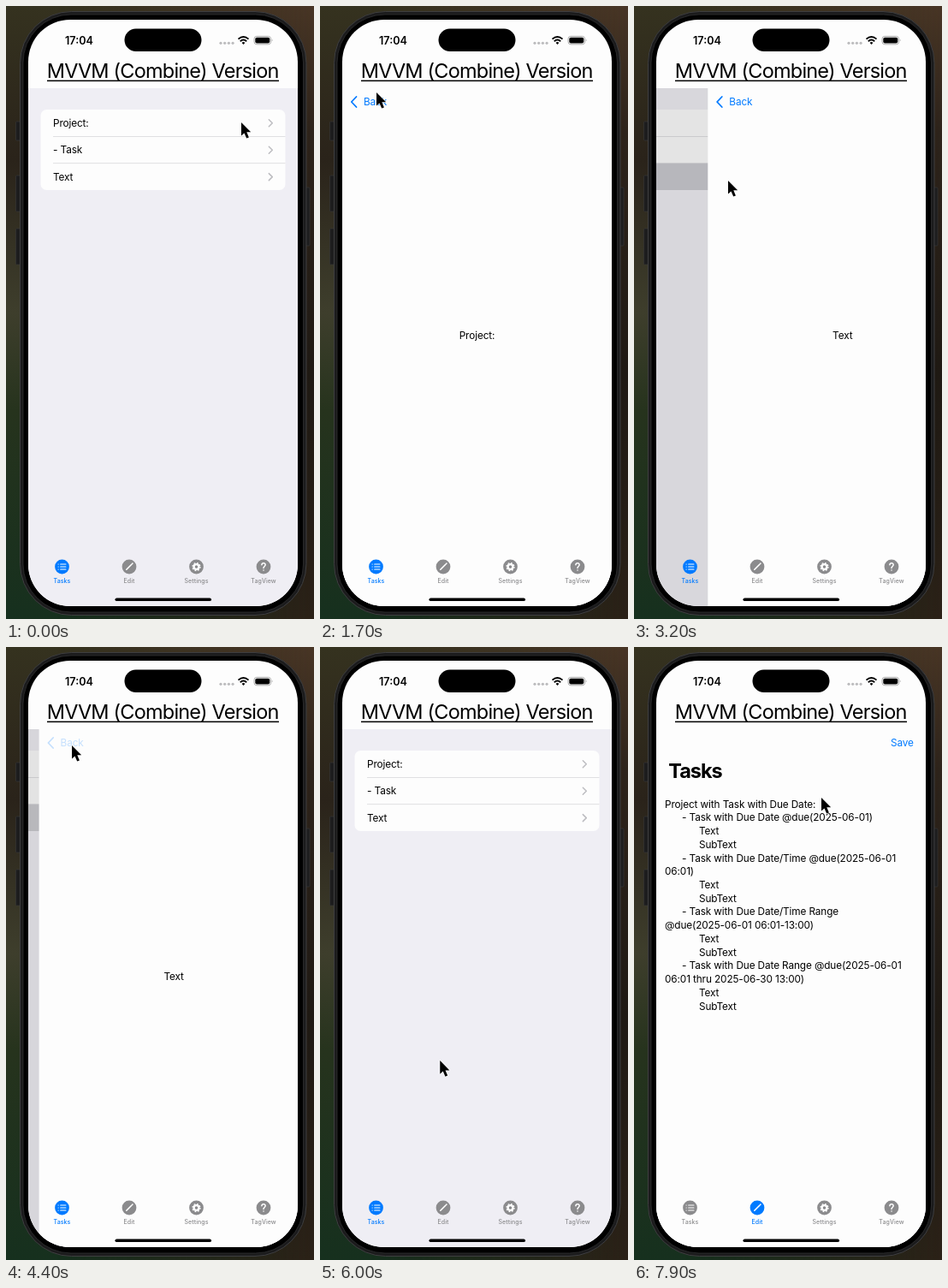
Recreate the animation shown at these times as an HTML page. Size 360 px wide and 716 px high, loop 8 s.

```html
<!DOCTYPE html>
<html lang="en">
<head>
<meta charset="utf-8">
<title>Task list demo</title>
<style>
  html, body { margin: 0; width: 100%; height: 100%; overflow: hidden; background: #1c1a14; }
  svg { display: block; width: 360px; height: 716px; }
  text { font: 11.8px Inter, "Liberation Sans", sans-serif; letter-spacing: -.01em; white-space: pre; }
  .mid { text-anchor: middle; }
  .title { font-size: 23.5px; letter-spacing: -.034em; }
  .bold { font-weight: 700; letter-spacing: -.045em; }
  .clock { font-size: 12.6px; font-weight: 600; letter-spacing: 0; }
  .tab text { font-size: 7px; font-weight: 500; letter-spacing: .01em; text-anchor: middle; }
  .blue { fill: #007aff; }
  .line { fill: none; stroke-linecap: round; stroke-linejoin: round; }
</style>
</head>
<body>
<svg viewBox="0 0 360 716">
  <defs>
    <linearGradient id="left" x2="0" y2="1">
      <stop offset="0" stop-color="#35321f"/><stop offset=".25" stop-color="#2a231a"/>
      <stop offset=".5" stop-color="#3e3e2c"/><stop offset=".66" stop-color="#26331d"/>
      <stop offset="1" stop-color="#16301e"/>
    </linearGradient>
    <linearGradient id="right" x2="0" y2="1">
      <stop offset="0" stop-color="#483525"/><stop offset=".2" stop-color="#2e241b"/>
      <stop offset=".6" stop-color="#1f1913"/><stop offset="1" stop-color="#2b2117"/>
    </linearGradient>
    <linearGradient id="blend">
      <stop offset="0" stop-color="#000"/><stop offset="1" stop-color="#fff"/>
    </linearGradient>
    <mask id="fade"><rect x="60" width="300" height="716" fill="url(#blend)"/></mask>
    <clipPath id="screen"><rect x="26" y="16" width="315" height="685" rx="49"/></clipPath>
    <clipPath id="content"><rect x="26" y="96" width="315" height="605"/></clipPath>
    <clipPath id="card"><rect x="40.5" y="121" width="286" height="94" rx="7"/></clipPath>
  </defs>

  <rect width="360" height="716" fill="url(#left)"/>
  <rect width="360" height="716" fill="url(#right)" mask="url(#fade)"/>
  <g fill="#1d1d1e" stroke="#39393a" stroke-width=".6">
    <rect x="11.5" y="135" width="6" height="22" rx="1"/>
    <rect x="11.5" y="198" width="6" height="42" rx="1"/>
    <rect x="11.5" y="260" width="6" height="42" rx="1"/>
    <rect x="350" y="212" width="5" height="68" rx="1"/>
  </g>
  <rect x="16.5" y="6.5" width="334.5" height="705" rx="60" fill="#1b1b1c" stroke="#3e3e40"/>
  <rect x="20" y="10" width="327.5" height="698" rx="56" stroke="#303032" stroke-width=".8"/>

  <g clip-path="url(#screen)">
    <rect x="26" y="16" width="315" height="685" fill="#fdfdfd"/>
    <g clip-path="url(#content)">
      <rect x="26" y="96" width="315" height="605" fill="#efeef4"/>
      <g id="list"></g>
      <rect id="dim" x="26" y="96" width="315" height="605"/>
      <g id="detail">
        <rect x="26" y="96" width="315" height="605" fill="#fdfdfd"/>
        <g id="back">
          <path class="line" d="M42.5 106L36.8 112L42.5 118" stroke="#007aff" stroke-width="1.8"/>
          <text class="blue" x="51" y="116">Back</text>
        </g>
        <text id="label" class="mid" x="183.5" y="389"></text>
      </g>
      <g id="edit">
        <rect x="0" y="60" width="370" height="680" fill="#fdfdfd"/>
        <g id="sheet">
          <text class="blue" x="300" y="115.9">Save</text>
          <text class="title bold" x="40.3" y="152.8">Tasks</text>
        </g>
      </g>
    </g>

    <text class="clock" x="69" y="44.5">17:04</text>
    <rect x="138.5" y="26.5" width="90" height="26.5" rx="13.25"/>
    <g fill="#bcbcbe">
      <circle cx="251" cy="43.3" r="1.6"/><circle cx="255.7" cy="43.3" r="1.6"/>
      <circle cx="260.4" cy="43.3" r="1.6"/><circle cx="265.1" cy="43.3" r="1.6"/>
    </g>
    <g fill="none" stroke="#000" stroke-width="1.9">
      <path d="M271.5 38.6Q277.5 33.2 283.5 38.6M273.8 41.2Q277.5 37.8 281.2 41.2"/>
      <path d="M275.6 42.9Q277.5 41.3 279.4 42.9L277.5 45Z" fill="#000" stroke="none"/>
    </g>
    <rect x="290" y="35.4" width="19.6" height="9.4" rx="3" fill="none" stroke="#9b9b9b" stroke-width=".8"/>
    <rect x="291.3" y="36.7" width="17" height="6.8" rx="1.9"/>
    <path d="M310.8 38.6Q312.6 40.1 310.8 41.6Z" fill="#9b9b9b"/>

    <text class="title mid" x="183.2" y="84">MVVM (Combine) Version</text>
    <rect x="48" y="86.6" width="271" height="1.5"/>
    <g id="tabs"></g>
    <rect x="127.5" y="691.4" width="112.5" height="3.7" rx="1.85"/>
  </g>

  <path id="cursor" d="M0 0V15.6L3.5 12.4L6.2 18.6L8.9 17.4L6.3 11.3H11.2Z"
        stroke="#fff" stroke-width="1.2" paint-order="stroke" stroke-linejoin="round"/>
</svg>
<script>
const $ = id => document.getElementById(id);
const LOOP = 8000, WIDTH = 315, ROW = 31.4;
const rows = ["Project:", "- Task", "Text"];

$("list").innerHTML = `<g clip-path="url(#card)">
  <rect x="40" y="121" width="287" height="95" fill="#fdfdfd"/>` +
  rows.map((name, i) => {
    const y = 121 + i * ROW;
    return `<rect class="press" x="40" y="${y}" width="287" height="${ROW}" fill="#cbcbd0" opacity="0"/>
      <text x="55" y="${y + 20}">${name}</text>
      <path class="line" d="M307.3 ${y + 11.8}l4 4l-4 4" stroke="#bdbdc1" stroke-width="1.5"/>` +
      (i ? `<rect x="55" y="${y - .4}" width="272" height=".7" fill="#d4d4d7"/>` : "");
  }).join("") + "</g>";
const presses = document.querySelectorAll(".press");

// Leading ">" marks each indent level.
`Project with Task with Due Date:
>- Task with Due Date @due(2025-06-01)
>>Text
>>SubText
>- Task with Due Date/Time @due(2025-06-01
06:01)
>>Text
>>SubText
>- Task with Due Date/Time Range
@due(2025-06-01 06:01-13:00)
>>Text
>>SubText
>- Task with Due Date Range @due(2025-06-01
06:01 thru 2025-06-30 13:00)
>>Text
>>SubText`.split("\n").forEach((line, i) => {
  const depth = line.match(/^>*/)[0].length;
  $("sheet").innerHTML +=
    `<text x="${36 + depth * 20}" y="${187.6 + i * 15.73}">${line.slice(depth)}</text>`;
});

const glyphs = {
  Tasks: `<path class="line" d="M-1.8 -3H4.4M-1.8 0H4.4M-1.8 3H4.4M-4.4 -3h.1M-4.4 0h.1M-4.4 3h.1" stroke="#fff" stroke-width="1.2"/>`,
  Edit: `<path class="line" d="M-3.2 3.2L3 -3M3.8 -3.8l.1 -.1" stroke="#fff" stroke-width="1.6"/>`,
  Settings: `<circle r="4.5" fill="none" stroke="#fff" stroke-width="1.3" stroke-dasharray="1.767"/>
    <circle r="2.9" fill="none" stroke="#fff" stroke-width="2.4"/>`,
  TagView: `<path class="line" d="M-2.1 -2.3C-1.9 -5 2.3 -4.8 2.2 -2.2C2.1 -.6 0 -.4 0 1.4M0 4h.05" stroke="#fff" stroke-width="1.5"/>`
};
$("tabs").innerHTML = Object.keys(glyphs).map((name, i) =>
  `<g class="tab" transform="translate(${65.5 + i * 78.5} 655)">
    <circle r="8.4"/>${glyphs[name]}<text y="18.6">${name}</text></g>`).join("");
const tabs = document.querySelectorAll(".tab");

// Each visit: row opened, push time, touch on Back, pop time.
const visits = [
  { row: 0, push: 400, touch: 1810, pop: 1880 },
  { row: 2, push: 3016, touch: 4300, pop: 4382 }
];
const SWITCH = 6480;
const pointer = [
  [0, 275, 136], [500, 275, 136], [1450, 67, 101], [1700, 66, 101], [1820, 68, 107],
  [2050, 68, 107], [2700, 113, 202], [3050, 113, 203], [3200, 110, 204], [4150, 77, 115],
  [4500, 77, 115], [5100, 128, 100], [5400, 134, 104], [6350, 143, 650], [6800, 143, 650],
  [7400, 213, 190], [7600, 214, 186], [7900, 219, 176], [LOOP, 219, 176]
];

const clamp = x => Math.min(1, Math.max(0, x));
const smooth = x => x * x * (3 - 2 * x);
// Critically damped spring going from 0 to 1.
const spring = ms => {
  const k = Math.max(0, ms) * .0165;
  return 1 - (1 + k) * Math.exp(-k);
};
const set = (el, name, value) => el.setAttribute(name, value);

function draw(t) {
  const visit = t < 2700 ? visits[0] : visits[1];
  const popped = spring(t - visit.pop);
  const shown = spring(t - visit.push) * (1 - popped);
  const slide = WIDTH * (1 - shown);
  set($("list"), "transform", `translate(${-.3 * WIDTH * shown} 0)`);
  set($("dim"), "opacity", .1 * clamp(shown * 1.2));
  set($("detail"), "transform", `translate(${slide < .3 ? 0 : slide} 0)`);
  set($("back"), "opacity", 1 - .78 * clamp((t - visit.touch) / 70));
  $("label").textContent = rows[visit.row];
  presses.forEach((el, i) =>
    set(el, "opacity", i === visit.row && t > visit.push - 70 ? 1 - popped : 0));

  const rest = 1 - clamp((t - SWITCH) / 260);
  const scale = 1 - .04 * rest ** 1.4;
  set($("edit"), "opacity", 1 - rest ** 1.7);
  set($("sheet"), "transform", `translate(183.5 398) scale(${scale}) translate(-183.5 -398)`);
  tabs.forEach((el, i) => set(el, "fill", i === (t < SWITCH ? 0 : 1) ? "#007aff" : "#8b8b8d"));

  const n = pointer.findIndex(p => p[0] > t);
  const [t0, x0, y0] = pointer[n - 1], [t1, x1, y1] = pointer[n];
  const k = smooth((t - t0) / (t1 - t0));
  set($("cursor"), "transform", `translate(${x0 + (x1 - x0) * k} ${y0 + (y1 - y0) * k})`);
}

const start = performance.now();
function frame() {
  draw((performance.now() - start) % LOOP);
  requestAnimationFrame(frame);
}
frame();
</script>
</body>
</html>
```
